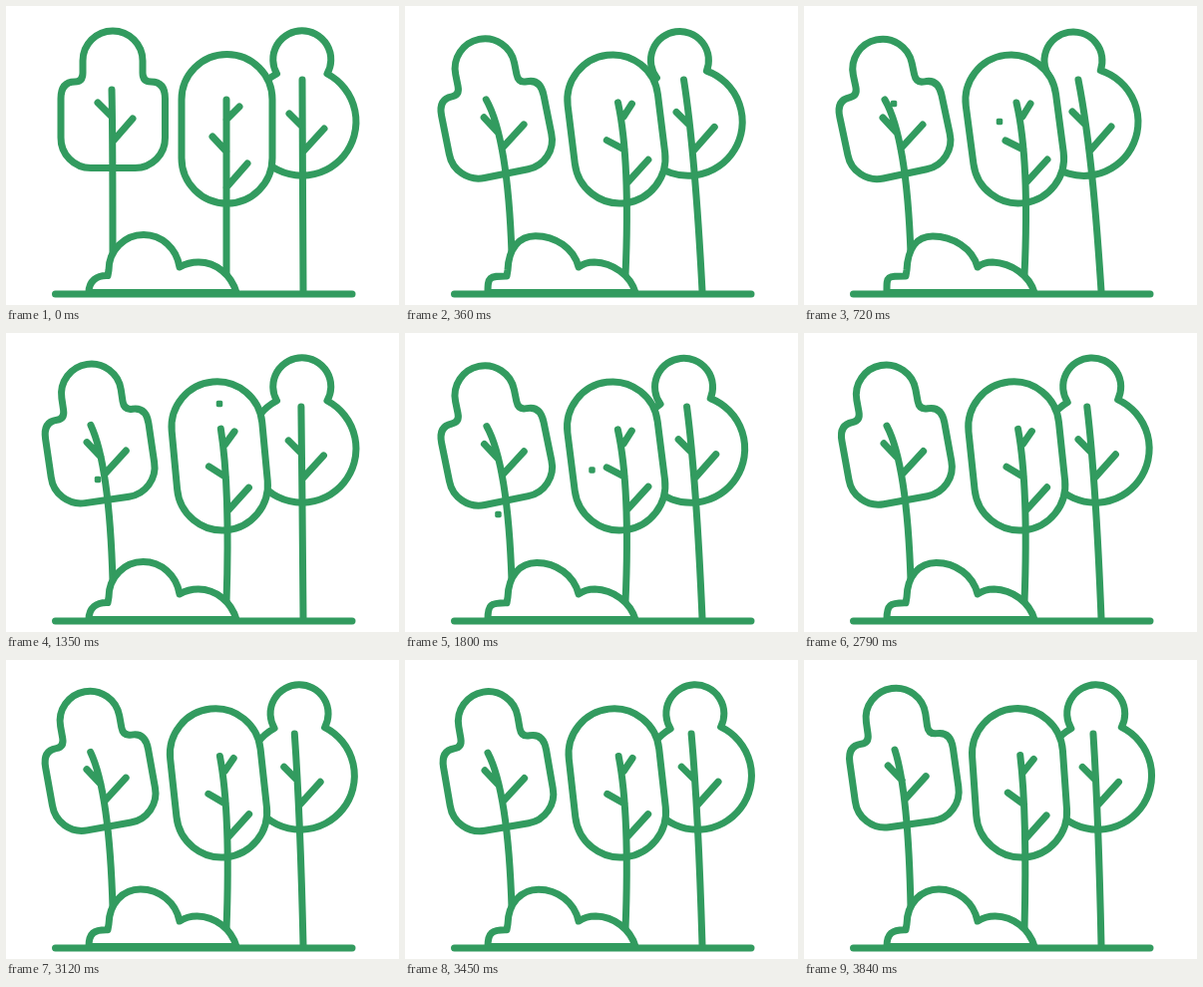
Animation, 394 px wide and 300 px high, one loop 3.87 s. Source, as an HTML page:

```html
<!DOCTYPE html>
<html lang="en">
<head>
<meta charset="utf-8">
<title>Trees in the wind</title>
<style>
  html, body { margin: 0; width: 100%; height: 100%; overflow: hidden; background: #fff; }
  svg { display: block; width: 100vw; height: 100vh; }
  .line { fill: none; stroke: #329b5f; stroke-width: 7; stroke-linecap: round; stroke-linejoin: round; }
  .solid { fill: #fff; }
  .leaf { fill: #329b5f; }
</style>
</head>
<body>
<svg viewBox="0 0 394 300">
  <g class="line">
    <path id="roundCrown" d="M271.5 68A29 29 0 1 1 322 68A54.2 54.2 0 1 1 271.5 68Z"/>
    <path id="roundStem"/>
    <path id="wideCrown" d="M77 55V67Q77 76 69 76Q55 76 55 93V132A30 30 0 0 0 85 162.5H129.500A30 30 0 0 0 159.500 132V93Q159.500 76 145.500 76Q137 76 137 67V55A30 30 0 0 0 77 55Z"/>
    <path id="wideStem"/>
    <rect id="tallCrown" class="solid" x="176" y="48.500" width="91" height="149.500" rx="45.500"/>
    <path id="tallStem"/>
    <path id="bush" class="solid"/>
    <path d="M49.500 289H347"/>
  </g>
  <g id="leaves"></g>
</svg>
<script>
const LOOP = 3870, STEP = 30;
const el = id => document.getElementById(id);

// Each shape at rest and fully bent by the wind.
const shapes = {
  wideStem: [
    'M107 249C107 190 107 125 106 84M92 97L106 111M127 113L107 136',
    'M107 249C105 190 99 125 81 94M79 112L93 127M119 119L97 143'
  ],
  tallStem: [
    'M221 270C221 205 221 140 221 94M234 101L221 114M207 131L221 146M242 158L221 182',
    'M221 270C224 205 223 140 213 97M227 98L219 111M202 135L220 144M244 154L223 177'
  ],
  roundStem: [
    'M298 286C298 225 297 140 297 74M284 108L297 121M319 123L298 146',
    'M298 286C294 225 288 140 275 74M269 106L281 118M308 121L287 145'
  ],
  bush: [
    'M83 287.5C83 276 91 270 102 270.5L103 265C103 245 119 229.5 138 229.5C156 229.5 171 243 174 262C181 258 187 257 193 257C211 257 226 270 231 287.5Z',
    'M83 287.5C83 271 82 271 102 271L103 265C104 243 113 231 129 231C149 231 169 243 174 262C180 257 185 257 189 257C208 258 226 270 231 287.5Z'
  ]
};

// time, wide crown angle and shift, then bend of: wide stem, tall tree, round crown, round stem
const gusts = [
  [0, 0, 0, 0, 0, 0, 0],
  [150, 7, 0, .6, .5, .3, .35],
  [330, 11.5, -6, 1, .95, .8, .8],
  [540, 8.5, -2, .75, .7, .7, .7],
  [720, 12, -6, 1, 1, 1, 1],
  [960, 9, -3, .75, .7, .4, .5],
  [1170, 11.7, -6, 1, .9, .25, .3],
  [1350, 8.3, -6, .84, .71, 0, .05],
  [1620, 9, -3, .75, .7, .3, .4],
  [1860, 12, -6, 1, 1, .7, .7],
  [2250, 9.7, 2, .64, .73, .55, .55],
  [2460, 11.7, -6, .95, .9, .02, .25],
  [2790, 10.3, -5.5, .92, .8, .3, .6],
  [3000, 11.8, -6, 1, .95, .05, .3],
  [3240, 8.5, -2, .7, .7, .15, .4],
  [3450, 9.8, -5.4, .92, .85, .22, .45],
  [3620, 11.8, -6, 1, .95, .08, .3],
  [3780, 10, -4.5, .8, .75, .1, .3],
  [3840, 8, 0, .6, .53, .15, .32]
];

// Falling leaves: visible span, a place and its time, speed in px per second
const leaves = [
  { from: 500, to: 1900, at: 720, x: 90, y: 98, vx: 3.2, vy: 77.8 },
  { from: 500, to: 1200, at: 720, x: 196, y: 116, vx: -10, vy: 78 },
  { from: 1200, to: 2600, at: 1350, x: 214, y: 71, vx: -58.9, vy: 147.8 }
];
for (const leaf of leaves) {
  leaf.node = document.createElementNS('http://www.w3.org/2000/svg', 'rect');
  for (const [name, value] of Object.entries({ class: 'leaf', width: 6.5, height: 6.5, rx: 1.8 }))
    leaf.node.setAttribute(name, value);
  el('leaves').append(leaf.node);
}

const mix = (a, b, k) => a + (b - a) * k;

function bend(id, k) {
  const [rest, bent] = shapes[id];
  const ends = bent.match(/[\d.]+/g);
  let i = 0;
  el(id).setAttribute('d', rest.replace(/[\d.]+/g, n => mix(+n, +ends[i++], k).toFixed(2)));
}

function windAt(t) {
  const i = gusts.findIndex(row => row[0] > t);
  if (i < 0) return gusts[gusts.length - 1];
  const a = gusts[i - 1], b = gusts[i];
  const k = (1 - Math.cos(Math.PI * (t - a[0]) / (b[0] - a[0]))) / 2;
  return a.map((v, j) => mix(v, b[j], k));
}

function tilt(id, dx, dy, angle, x, y) {
  el(id).setAttribute('transform', `translate(${dx} ${dy}) rotate(${-angle} ${x} ${y})`);
}

function draw(t) {
  const [, angle, shift, wide, tall, crown, round] = windAt(t);
  tilt('wideCrown', shift, .27 * angle - .45 * shift, angle, 107, 162);
  tilt('tallCrown', -6.5 * tall, 0, 7.5 * tall, 221.5, 152);
  tilt('roundCrown', -16 * crown, 0, 10 * crown, 298, 116);
  bend('wideStem', wide);
  bend('tallStem', tall);
  bend('roundStem', round);
  bend('bush', round);
  for (const { node, from, to, at, x, y, vx, vy } of leaves) {
    const s = (t - at) / 1000;
    node.setAttribute('x', x + vx * s - 3.25);
    node.setAttribute('y', y + vy * s - 3.25);
    node.setAttribute('visibility', t >= from && t < to ? 'visible' : 'hidden');
  }
}

const start = performance.now();
function tick() {
  const t = (performance.now() - start) % LOOP;
  draw(Math.floor(t / STEP) * STEP);
  requestAnimationFrame(tick);
}
tick();
</script>
</body>
</html>
```
